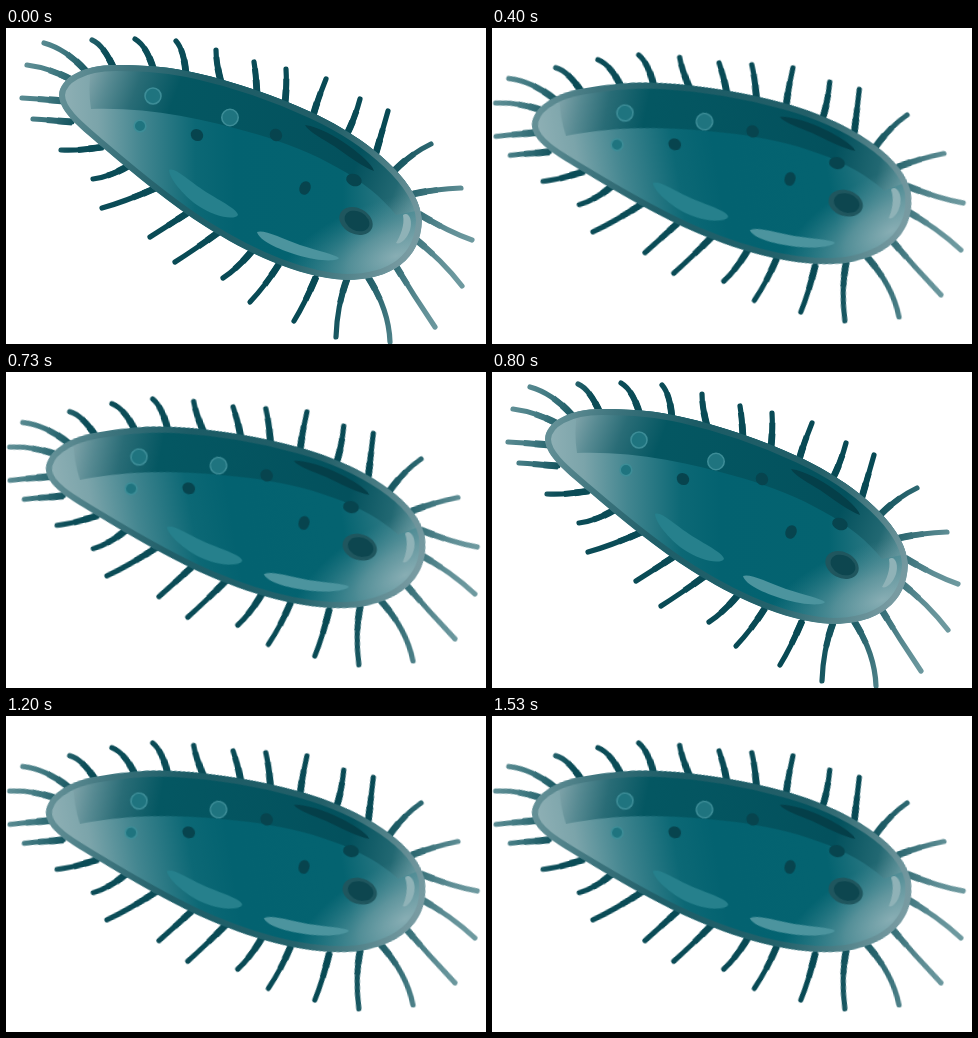
Animation, 480 px wide and 316 px high, one loop 1.59 s. Source, as an HTML page:

```html
<!DOCTYPE html>
<html lang="en">
<head>
<meta charset="utf-8">
<title>Bacterium</title>
<style>
  html, body { margin: 0; width: 100%; height: 100%; overflow: hidden; background: #fff; }
  svg { display: block; width: 480px; height: 316px; }
  .cell { transform-origin: 0 0; animation: tilt 1590ms step-end infinite; }
  /* two held poses, switching at 400, 800 and 1200 ms */
  @keyframes tilt {
    0%, 50.314% { transform: none; }
    25.157%, 75.472% { transform: translate(133px, 85px) rotate(-9.4deg) translate(-147px, -68px); }
    100% { transform: none; }
  }
  .cilia { fill: none; stroke: url(#hair); stroke-width: 5.2; stroke-linecap: round; }
  .taper { stroke-width: 6; stroke-dasharray: 25 400; stroke-linecap: butt; }
  .root { stroke-width: 6.8; stroke-dasharray: 14 400; stroke-linecap: butt; }
  .bubble { fill: #1f747f; stroke: #3d8d97; stroke-width: 1.6; }
  .spot { fill: #07444e; }
</style>
</head>
<body>
<svg viewBox="0 0 480 316">
  <defs>
    <linearGradient id="hair" gradientUnits="userSpaceOnUse" x1="19" y1="7" x2="479" y2="173">
      <stop offset="0" stop-color="#6b979d"/>
      <stop offset=".08" stop-color="#427a82"/>
      <stop offset=".17" stop-color="#0b4c57"/>
      <stop offset=".76" stop-color="#074954"/>
      <stop offset=".86" stop-color="#2d6871"/>
      <stop offset=".95" stop-color="#5f8e95"/>
      <stop offset="1" stop-color="#6d999f"/>
    </linearGradient>
    <linearGradient id="skin" gradientUnits="userSpaceOnUse" x1="56" y1="90" x2="416" y2="90">
      <stop offset="0" stop-color="#8fb0b5"/>
      <stop offset=".1" stop-color="#7ba4aa"/>
      <stop offset=".22" stop-color="#438690"/>
      <stop offset=".37" stop-color="#0c6875"/>
      <stop offset=".48" stop-color="#036270"/>
      <stop offset=".78" stop-color="#046370"/>
      <stop offset="1" stop-color="#4a8891"/>
    </linearGradient>
    <linearGradient id="shade" gradientUnits="userSpaceOnUse" x1="80" y1="55" x2="408" y2="180">
      <stop offset="0" stop-color="#7fa3a9"/>
      <stop offset=".06" stop-color="#578a92"/>
      <stop offset=".14" stop-color="#296c76"/>
      <stop offset=".25" stop-color="#045762"/>
      <stop offset=".8" stop-color="#03515d"/>
      <stop offset=".93" stop-color="#226872"/>
      <stop offset="1" stop-color="#5d8f96"/>
    </linearGradient>
    <linearGradient id="rim" gradientUnits="userSpaceOnUse" x1="56" y1="68" x2="412" y2="197">
      <stop offset="0" stop-color="#5d8b92"/>
      <stop offset=".15" stop-color="#3b727b"/>
      <stop offset=".35" stop-color="#1f5c66"/>
      <stop offset=".7" stop-color="#27616a"/>
      <stop offset=".88" stop-color="#56848b"/>
      <stop offset="1" stop-color="#7799a0"/>
    </linearGradient>
    <radialGradient id="glow" gradientUnits="userSpaceOnUse" cx="0" cy="0" r="1"
                    gradientTransform="translate(390 228) rotate(-18) scale(125 58)">
      <stop offset="0" stop-color="#9dbabf" stop-opacity=".8"/>
      <stop offset=".4" stop-color="#86abb1" stop-opacity=".58"/>
      <stop offset="1" stop-color="#5a97a0" stop-opacity="0"/>
    </radialGradient>
    <path id="body" d="M53 67 C54 50 76 37 110 37 C140 37 165 39 190 45
      C230 54 270 68 307 85 C365 112 414 155 416 192 C415 232 385 252 340 252
      C290 249 240 224 200 199 C165 177 130 148 95 118 C78 103 53 85 53 67Z"/>
    <clipPath id="inside"><use href="#body"/></clipPath>
    <g id="hairs">
      <path d="M80 43 Q60 21 38 15 M66 52 Q44 40 21 37 M109 43 Q98 17 86 12
        M148 43 Q141 18 129 11 M180 46 Q178 22 170 13 M215 54 Q210 35 210 22
        M251 66 Q250 46 248 34 M279 76 Q281 55 280 41 M307 88 Q312 70 320 51
        M341 106 Q349 90 354 71 M370 125 Q376 104 382 83 M389 142 Q406 125 425 116
        M407 166 Q430 161 455 160 M413 186 Q443 204 466 212"/>
      <path d="M57 73 Q36 71 16 70 M66 94 Q43 92 27 91 M97 119 Q72 123 55 122
        M124 137 Q104 149 87 151 M150 160 Q118 174 96 180 M183 184 Q163 197 144 209
        M213 204 Q188 222 169 234 M246 223 Q231 241 217 250 M273 236 Q260 257 244 274
        M310 249 Q299 275 288 293 M341 251 Q331 278 330 309 M362 249 Q383 282 384 314
        M388 235 Q408 268 429 299 M408 210 Q436 232 456 258"/>
    </g>
  </defs>

  <g class="cell">
    <use href="#hairs" class="cilia"/>
    <use href="#hairs" class="cilia taper"/>
    <use href="#hairs" class="cilia root"/>
    <g clip-path="url(#inside)">
      <use href="#body" fill="url(#skin)"/>
      <path fill="url(#shade)" d="M87 30 Q81 56 85 81 C140 79 195 90 250 106
        C308 123 362 151 390 187 L425 180 L400 110 L300 55 L180 30Z"/>
      <use href="#body" fill="url(#glow)"/>
      <use href="#body" fill="none" stroke="url(#rim)" stroke-width="12" opacity=".88"/>
    </g>

    <path fill="#26808c" d="M163 142 C169 139 183 153 200 164 C216 174 231 181 232 187
      C228 193 207 188 191 177 C176 166 164 151 163 142Z"/>
    <path fill="#4c949e" d="M251 204 C257 201 276 210 294 217 C312 223 328 226 333 230
      C331 234 310 233 291 227 C271 221 253 212 251 204Z"/>
    <path fill="#8fb2b7" d="M397 187 C403 183 407 193 404 202 C401 211 394 217 390 215
      C394 208 399 198 397 187Z"/>
    <path fill="#043f49" d="M299 97 C313 99 329 108 343 118 C355 127 366 136 368 143
      C357 139 342 128 328 118 C317 111 303 104 299 97Z"/>

    <g class="bubble">
      <circle cx="147" cy="68" r="8"/>
      <circle cx="224" cy="89.500" r="8.200"/>
      <circle cx="134" cy="98" r="5.800"/>
    </g>
    <g class="spot">
      <ellipse cx="191" cy="107" rx="6.500" ry="5.800" transform="rotate(40 191 107)"/>
      <ellipse cx="270" cy="107" rx="6.500" ry="6" transform="rotate(50 270 107)"/>
      <ellipse cx="299" cy="160" rx="5.500" ry="7" transform="rotate(25 299 160)"/>
      <ellipse cx="348" cy="152" rx="8" ry="6" transform="rotate(20 348 152)"/>
      <ellipse cx="350" cy="193" rx="17.500" ry="13" transform="rotate(27 350 193)" fill="#1f565e"/>
      <ellipse cx="351" cy="193" rx="13" ry="9.500" transform="rotate(27 351 193)" fill="#0d464f"/>
    </g>
  </g>
</svg>
</body>
</html>
```
